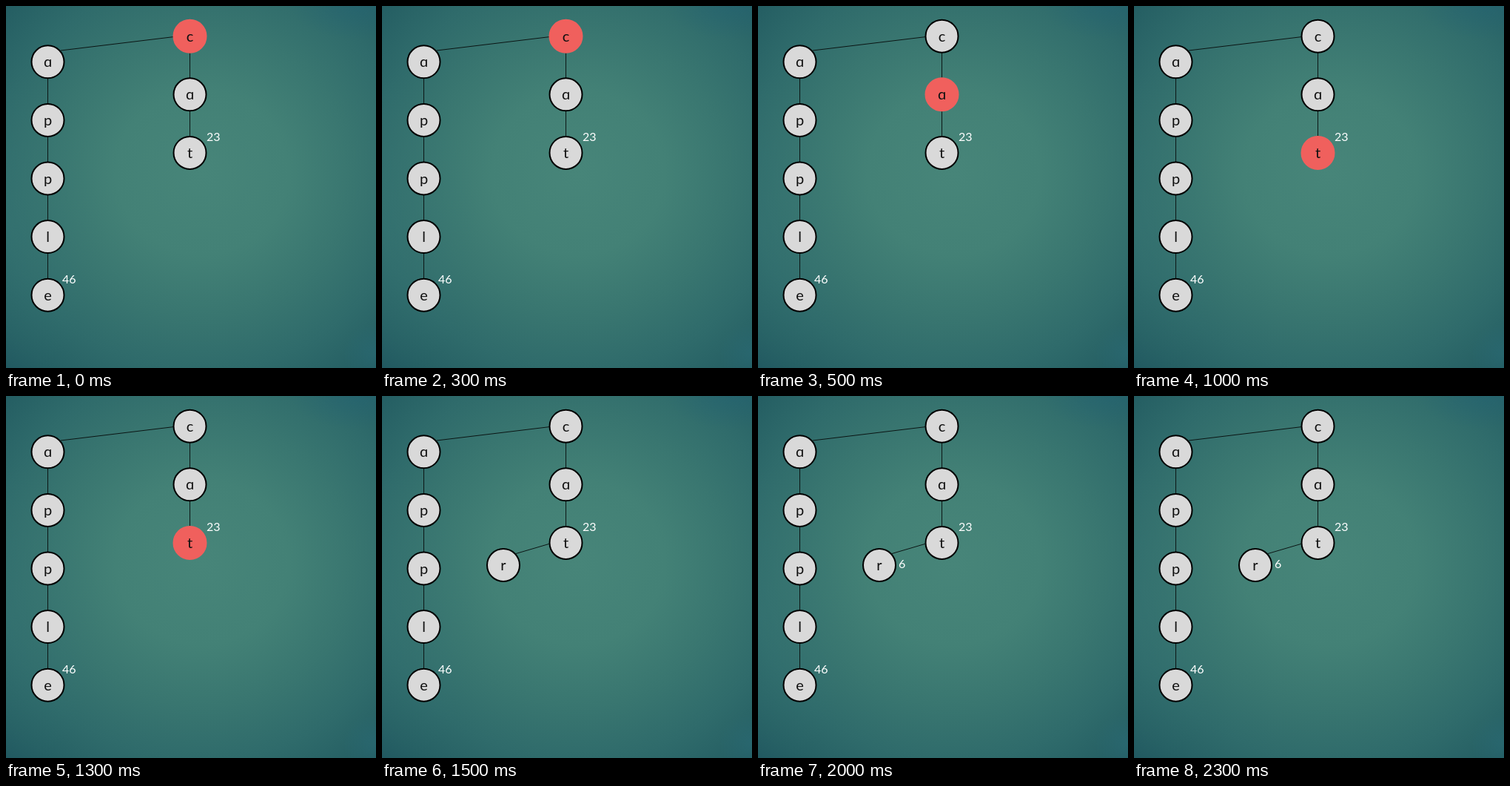
These frames come from a looping animation (500x488 px, 2500 ms). An HTML page:

```html
<!DOCTYPE html>
<html lang="en">
<head>
<meta charset="utf-8">
<title>Trie insertion</title>
<style>
  html, body { margin: 0; width: 100%; height: 100%; overflow: hidden; }
  body {
    background:
      radial-gradient(90px 45px at 475px 0, #24647488, #24647400),
      radial-gradient(45px 40px at 500px 468px, #2a6a74aa, #2a6a7400),
      radial-gradient(130px 210px at 0 300px, #38777566, #38777500),
      radial-gradient(390px 370px at 265px 225px,
        #478579, #438176 30%, #397670 52%, #2f6b6b 72%, #266064 88%, #1f565f);
  }
  svg { display: block; }
  line { stroke: #0b1514; }
  circle { fill: #d9d9d9; stroke: #000; stroke-width: 2; }
  .active circle { fill: #f0605d; stroke: #f0605d; }
  text { font: 16px Lato, "Noto Sans", sans-serif; fill: #fff; }
  .node text { font-size: 20px; fill: #111; text-anchor: middle; }
</style>
</head>
<body>
<svg id="stage" width="500" height="488" viewBox="0 0 500 488"></svg>
<script>
const stage = document.getElementById('stage');
const STEP = 500, STEPS = 5;

function add(parent, tag, attrs = {}, text = '') {
  const el = document.createElementNS('http://www.w3.org/2000/svg', tag);
  for (const key in attrs) el.setAttribute(key, attrs[key]);
  el.textContent = text;
  return parent.appendChild(el);
}

const edge = (x1, y1, x2, y2, parent = stage) => add(parent, 'line', { x1, y1, x2, y2 });
const label = (x, y, value) => add(stage, 'text', { x, y }, value);

function node(x, y, letter, parent = stage) {
  const group = add(parent, 'g', { class: 'node' });
  add(group, 'circle', { cx: x, cy: y, r: 22 });
  add(group, 'text', { x, y: y + 7 }, letter);
  return group;
}

// A vertical chain of nodes; "ɑ" gives the single-storey letter form.
function chain(x, y, letters) {
  const gap = 78.6;
  edge(x, y, x, y + gap * (letters.length - 1));
  return [...letters].map((letter, i) => node(x, y + gap * i, letter));
}

edge(74, 60, 227, 41.5);
chain(56.5, 75.3, 'ɑpple');
const path = chain(248.5, 40.7, 'cɑt');
label(76, 374, '46');
label(271, 182, '23');

const branch = add(stage, 'g');
edge(181, 212.5, 227, 199, branch);
node(164, 228, 'r', branch);
const value = label(190, 232, '6');

function draw(now) {
  const step = Math.floor(now / STEP) % STEPS;
  path.forEach((group, i) => group.classList.toggle('active', i === step));
  branch.style.display = step >= 3 ? '' : 'none';
  value.style.display = step >= 4 ? '' : 'none';
}

const start = performance.now();
function tick() {
  draw(performance.now() - start);
  requestAnimationFrame(tick);
}
tick();
</script>
</body>
</html>
```
